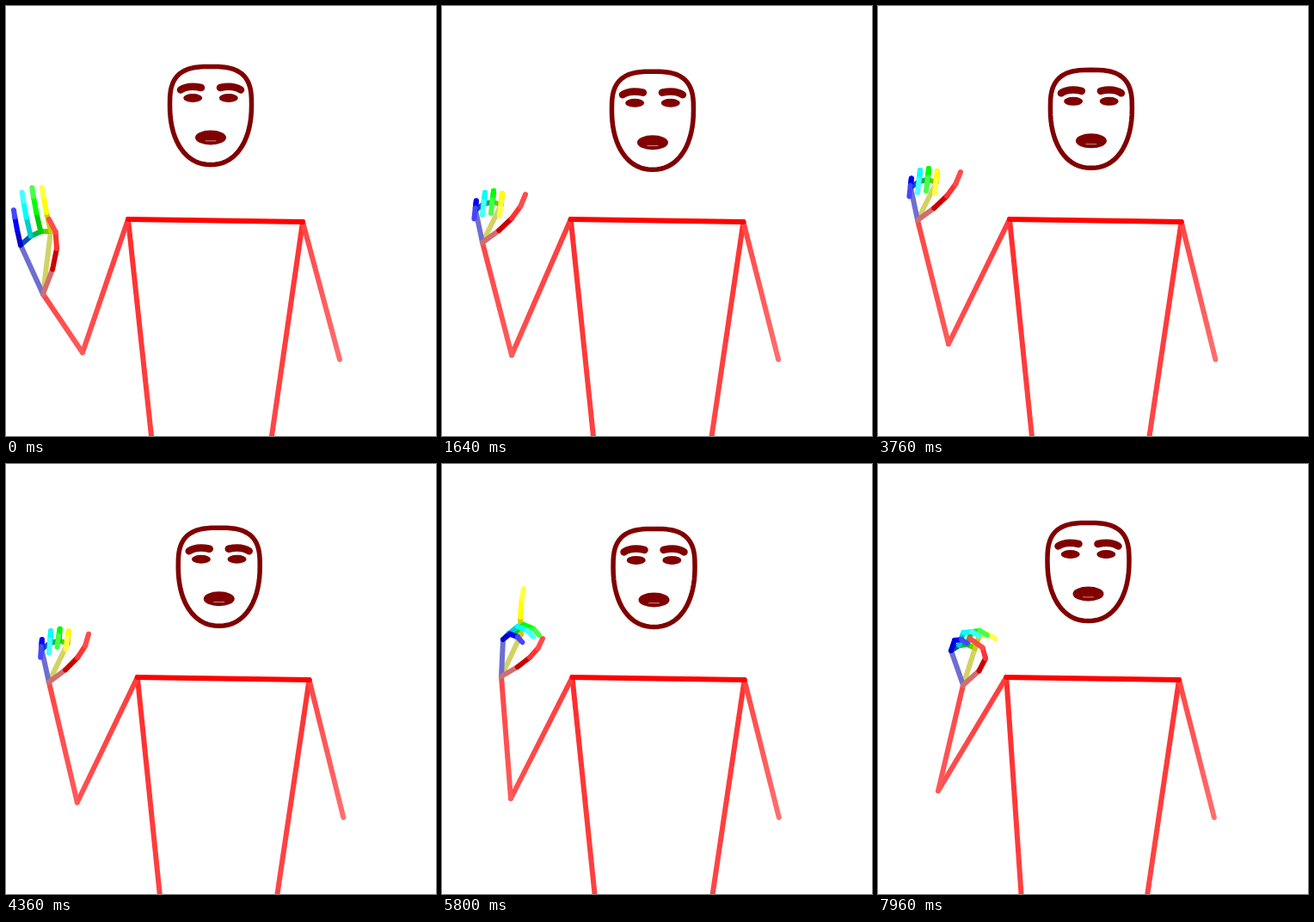
An HTML page with a canvas for the animation above (8 s loop, 500 by 500 pixels).

```html
<!DOCTYPE html>
<html lang="en">
<head>
<meta charset="utf-8">
<title>Signing figure</title>
<style>
  html, body { margin: 0; width: 100%; height: 100%; overflow: hidden; background: #fff; }
  canvas { display: block; width: 100vw; height: 100vh; }
</style>
</head>
<body>
<canvas id="stage" width="500" height="500"></canvas>
<script>
const ctx = document.getElementById('stage').getContext('2d');
const LOOP = 8000, STEP = 40;
const MAROON = '#800000';

// Hand shapes, relative to the wrist. Every finger rises by `reach` from its
// knuckle, then bends by `curl`; the first `count` fingers may be raised instead.
const thumbOut = { bend: [34, -28], tip: [50, -56] };
const thumbIn = { bend: [26, -31], tip: [8, -54] };
const open = { thumb: { bend: [16, -53], tip: [7, -87] }, index: [9, -73], pinky: [-26, -57],
  reach: [-5, -22], curl: [-5, -29] };
const fist = { thumb: thumbOut, index: [22, -44], pinky: [-8, -38], reach: [1, -13], curl: [-3, 26] };
const tucked = { thumb: { bend: [33, -23], tip: [16, -43] }, index: [21, -38], pinky: [-13, -35],
  reach: [6, -13], curl: [-2, 21] };
const two = { thumb: thumbIn, index: [21, -56], pinky: [-13, -40], reach: [-4, -21], curl: [7, 20],
  raised: { count: 2, reach: [1, -23], curl: [-5, -27] } };
const point = { thumb: { bend: [33, -22], tip: [48, -44] }, index: [23, -49], pinky: [2, -43],
  reach: [10, -8], curl: [18, 12], raised: { count: 1, reach: [-1, -20], curl: [4, -33] } };
const bent = { thumb: thumbIn, index: [14, -43], pinky: [-14, -40], reach: [5, -15], curl: [18, 4] };

const SIGNS = [
  { start: 0, end: 120, shape: open, elbow: [89, 403], wrist: [43, 335] },
  { start: 840, end: 1720, shape: fist, elbow: [81, 406], wrist: [47, 275] },
  { start: 2240, end: 2800, shape: tucked, elbow: [28, 429], wrist: [91, 255] },
  { start: 3280, end: 4240, shape: fist, elbow: [82, 393], wrist: [46, 249] },
  { start: 4880, end: 4960, shape: two, elbow: [91, 399], wrist: [88, 298] },
  { start: 5400, end: 7200, shape: point, elbow: [80, 389], wrist: [69, 247] },
  { start: 7800, end: LOOP, shape: bent, elbow: [70, 380], wrist: [99, 257] }];

// [time, height] of the head
const NOD = [[0, 0], [1640, 5.7], [2120, 0.5], [2760, 4], [4920, 3.7], [6920, 6.6], [7560, 6], [7800, -2]];

const THUMB_COLORS = ['#d26e6e', '#cc0000', '#ff3232', '#ff4b4b'];
const KNUCKLE_COLORS = ['#66cc00', '#00b450', '#0a50be'];
const FINGER_COLORS = [[1, 1, 0], [0, 1, 0], [0, 1, 1], [0, 0, 1]].map(hue =>
  [[0, 204], [0, 255], [70, 255]].map(([low, high]) =>
    `rgb(${hue.map(on => on ? high : low)})`));

const mix = (a, b, k) => a + (b - a) * k;
const mixPoint = (p, q, k) => p.map((v, i) => mix(v, q[i], k));
const add = (p, q, k = 1) => p.map((v, i) => v + q[i] * k);
const ease = k => {
  k = Math.min(1, Math.max(0, k));
  return k * k * (3 - 2 * k);
};

function nod(t) {
  return NOD.reduce((y, [time, next], i) =>
    i ? mix(y, next, ease((t - NOD[i - 1][0]) / (time - NOD[i - 1][0]))) : next, 0);
}

// The body drifts aside and part of the way back over one loop
function sway(t) {
  const u = t / LOOP;
  return 1.1 * Math.sin(4.14 * u - 1.71 * u * u);
}

function thumbJoints({ bend, tip }) {
  const control = add(add(bend, bend), tip, -0.5);
  return [0, 0.25, 0.5, 0.75, 1].map(k =>
    mixPoint(mixPoint([0, 0], control, k), mixPoint(control, tip, k), k));
}

function fingerJoints(shape, i) {
  const { reach, curl } = shape.raised && i < shape.raised.count ? shape.raised : shape;
  const size = i === 3 ? 0.8 : 1;
  const arch = i % 3 ? -5 : 0;
  const knuckle = add(mixPoint(shape.index, shape.pinky, i / 3), [0, arch]);
  const middle = add(knuckle, reach, size);
  const tip = add(middle, curl, size);
  return [knuckle, middle, add(mixPoint(middle, tip, 0.5), reach, 0.2 * size), tip];
}

// Joint chains of a whole arm: thumb, four fingers, elbow
function armChains({ shape, elbow, wrist }) {
  const hand = [thumbJoints(shape.thumb), ...[0, 1, 2, 3].map(i => fingerJoints(shape, i))];
  return [...hand.map(chain => chain.map(p => add(p, wrist))), [elbow]];
}

function armAt(t) {
  const i = SIGNS.findLastIndex(s => s.start <= t);
  const from = SIGNS[i], to = SIGNS[i + 1] || from;
  const k = to === from ? 0 : ease((t - from.end) / (to.start - from.end));
  const target = armChains(to);
  return armChains(from).map((chain, c) => chain.map((p, j) => mixPoint(p, target[c][j], k)));
}

function line(a, b, color, endColor = color) {
  const paint = ctx.createLinearGradient(...a, ...b);
  paint.addColorStop(0, color);
  paint.addColorStop(1, endColor);
  ctx.strokeStyle = paint;
  ctx.beginPath();
  ctx.moveTo(...a);
  ctx.lineTo(...b);
  ctx.stroke();
}

const drawChain = (joints, colors) =>
  colors.forEach((color, i) => line(joints[i], joints[i + 1], color));

function blob(x, y, rx, ry) {
  ctx.beginPath();
  ctx.ellipse(x, y, rx, ry, 0, 0, 2 * Math.PI);
  ctx.fill();
}

// Superellipse with a square brow and a rounder, longer chin
function faceOutline() {
  const power = (v, n) => Math.sign(v) * Math.abs(v) ** (2 / n);
  ctx.beginPath();
  for (let i = 0; i < 72; i++) {
    const a = i * Math.PI / 36, s = Math.sin(a);
    const [n, height] = s < 0 ? [2.9, 44.5] : [2.2, 69.5];
    ctx.lineTo(47.5 * power(Math.cos(a), n), 115 + height * power(s, n));
  }
  ctx.closePath();
  ctx.stroke();
}

function drawHead(x, y) {
  ctx.save();
  ctx.translate(x, y);
  ctx.strokeStyle = ctx.fillStyle = MAROON;
  ctx.lineWidth = 5.5;
  faceOutline();
  ctx.lineWidth = 8.5;
  for (const side of [-1, 1]) {
    ctx.beginPath();
    ctx.moveTo(35 * side, 97.5);
    ctx.quadraticCurveTo(26 * side, 91.5, 11 * side, 95);
    ctx.stroke();
    blob(20.8 * side, 107, 11, 5);
  }
  blob(0, 153, 18, 8.5);
  ctx.lineWidth = 0.8;
  line([-6, 156.8], [6, 156.8], '#d8b0b0');
  ctx.restore();
}

function draw(t) {
  const [thumb, ...chains] = armAt(t);
  const [elbow] = chains.pop();
  const wrist = thumb[0];
  const s = sway(t);
  const right = [142 + 10 * s, 248], left = [345 + 7 * s, 251];
  const lean = Math.min(9, Math.max(0, (wrist[0] - elbow[0]) / 3));

  ctx.fillStyle = '#fff';
  ctx.fillRect(0, 0, 500, 500);
  ctx.lineCap = ctx.lineJoin = 'round';
  drawHead(238 + 9 * s, nod(t));

  ctx.lineWidth = 6;
  line(right, [169 + 9 * s - lean, 500], '#ff2d2d', '#ff4141');
  line(left, [309 + 6 * s, 500], '#ff3232', '#ff4646');
  line(right, elbow, '#ff3c3c', '#ff5050');
  line(elbow, wrist, '#ff5a5a', '#ff4646');
  line(left, [388 + 4 * s, 411], '#ff4646', '#ff6e6e');
  line(right, left, '#ff0000');

  line(wrist, chains[0][0], '#d2d264');
  line(wrist, chains[3][0], '#6e6ed2');
  drawChain(chains.map(chain => chain[0]), KNUCKLE_COLORS);
  chains.forEach((chain, i) => drawChain(chain, FINGER_COLORS[i]));
  drawChain(thumb, THUMB_COLORS);
}

const begin = performance.now();
function tick() {
  const t = (performance.now() - begin) % LOOP;
  draw(Math.floor(t / STEP) * STEP);
  requestAnimationFrame(tick);
}
tick();
</script>
</body>
</html>
```
